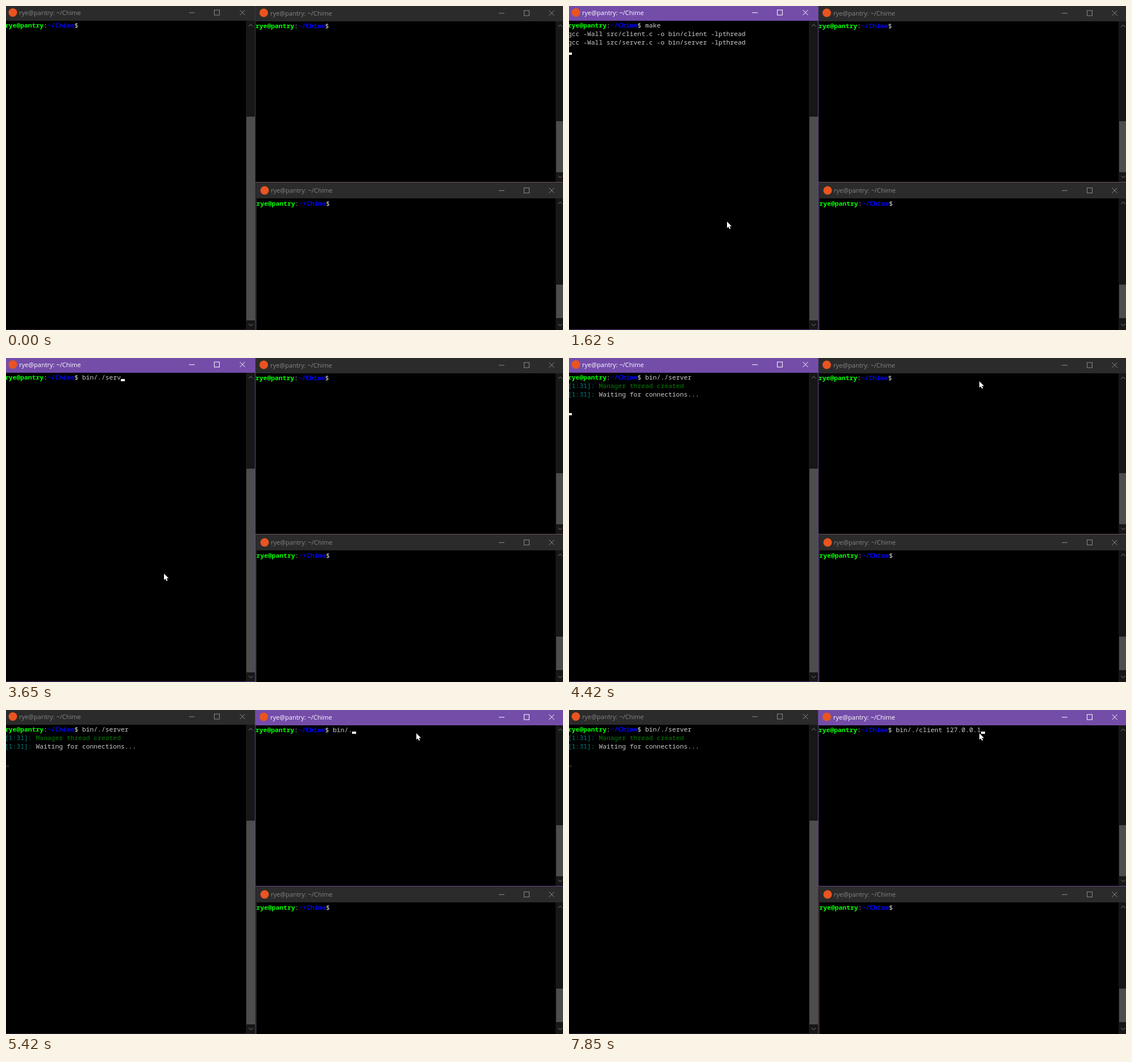
Write an HTML page with a canvas that moves like this. It is 980 by 571 pixels and loops after 8 s.

```html
<!DOCTYPE html>
<html lang="en">
<head>
<meta charset="utf-8">
<title>Terminals</title>
<style>
html, body { margin: 0; width: 100%; height: 100%; overflow: hidden; background: #000; }
canvas { display: block; width: 980px; height: 571px; }
</style>
</head>
<body>
<canvas id="stage" width="980" height="571"></canvas>
<script>
const ctx = document.getElementById('stage').getContext('2d');
const LOOP = 8000, CELL = 6.8, LINE = 15;
const USER = 'rye@pantry', PATH = '~/Chime', PROMPT_COLS = 20;
const MONO = '11.33px "Noto Sans Mono", monospace';
const SANS = '11px "Open Sans", sans-serif';
const GREY = '#ccc', TEAL = '#008080', GREEN = '#008000';

const left = { x: 0, y: 0, w: 438, h: 570, bar: 26, icon: [12, 11.5], title: [23, 16],
  buttons: [327, 371, 416], mid: 11, text: [-2, 38], track: [422, 16], thumb: [195, 554], arrows: [430.5, 34, 562] };
const upper = { x: 439, y: 0, w: 541, h: 310, bar: 27, icon: [453.5, 12], title: [465, 17],
  buttons: [872, 916, 960], mid: 12, text: [439, 39], track: [967, 13], thumb: [203, 293], arrows: [975, 35, 301] };
const lower = { x: 441, y: 311, w: 539, h: 260, bar: 28, icon: [455, 325], title: [466, 329],
  buttons: [872, 916, 960], mid: 324.5, text: [440.5, 352], track: [967, 13], thumb: [491, 550], arrows: [975, 347, 562] };

// Each entry is a time and the command visible from then on.
const makeTyping = [[0, ''], [840, 'm'], [915, 'ma'], [990, 'make']];
const serverTyping = [[0, ''], ...typed('', 'bin', 2690, 85), [3010, 'bin/'],
  ...typed('bin/', './ser', 3170, 80), ...typed('bin/./ser', 'ver', 3650, 75)];
const clientTyping = [[0, ''], ...typed('', 'bin', 4960, 80), [5270, 'bin/'], [5420, 'bin/.'],
  [5670, 'bin/.c'], [5970, 'bin/.'], [6200, 'bin/./'], [6370, 'bin/./c'],
  ...typed('bin/./c', 'lie', 6520, 77), ...typed('bin/./clien', 't 127', 6751, 77),
  ...typed('bin/./client 127', '.0.0.', 7370, 75), [7850, 'bin/./client 127.0.0.1']];
const mousePath = [[70, [638, 509]], [140, [430, 434]], [210, [278, 380]],
  [4270, [380, 302]], [4345, [604, 131]], [4420, [722, 41]]];

function typed(prefix, word, start, step) {
  return [...word].map((c, i) => [start + i * step, prefix + word.slice(0, i + 1)]);
}

function latest(steps, t) {
  let value;
  for (const [time, v] of steps) if (time <= t) value = v;
  return value;
}

function box(x, y, w, h, color) {
  ctx.fillStyle = color;
  ctx.fillRect(x, y, w, h);
}

function disc(x, y, r, color) {
  ctx.fillStyle = color;
  ctx.beginPath();
  ctx.arc(x, y, r, 0, Math.PI * 2);
  ctx.fill();
}

function stroke(color, ...lines) {
  ctx.strokeStyle = color;
  ctx.lineWidth = 1;
  ctx.beginPath();
  for (const line of lines) line.forEach(([x, y], i) => i ? ctx.lineTo(x, y) : ctx.moveTo(x, y));
  ctx.stroke();
}

function write(win, col, row, text, color, weight = 400) {
  ctx.font = `${weight} ${MONO}`;
  ctx.fillStyle = color;
  ctx.fillText(text, win.text[0] + col * CELL, win.text[1] + row * LINE);
}

function block(win, col, row, color = '#fff') {
  const x = Math.round(win.text[0] + col * CELL);
  box(x, win.text[1] - 1 + row * LINE, 7, 4, color);
}

function prompt(win, command = '') {
  write(win, 0, 0, USER, '#00ff00', 600);
  write(win, 10, 0, ':', GREY);
  write(win, 11, 0, PATH, '#0000ff', 600);
  write(win, 18, 0, '$', '#ddd');
  write(win, PROMPT_COLS, 0, command, GREY);
}

function commandLine(win, command, focused) {
  prompt(win, command);
  if (focused) block(win, PROMPT_COLS + command.length, 0);
}

function frame(win, active) {
  const { x, y, w, h, bar, mid } = win;
  box(x, y, w, h, '#000');
  box(x, y, w, bar, active ? '#744da9' : '#2b2b2b');
  disc(...win.icon, 7.5, '#e95420');
  ctx.font = SANS;
  ctx.fillStyle = active ? '#fff' : '#858585';
  ctx.fillText(`${USER}: ${PATH}`, ...win.title);

  const [min, max, close] = win.buttons, ink = active ? '#fff' : '#8b8b8b';
  stroke(ink, [[min - 5, mid + .8], [min + 5, mid + .8]],
    [[close - 4.5, mid - 4], [close + 4.5, mid + 5]], [[close + 4.5, mid - 4], [close - 4.5, mid + 5]]);
  ctx.strokeRect(max - 4.5, mid - 4, 9, 9);

  const [tx, tw] = win.track, [from, to] = win.thumb, [ax, ...ays] = win.arrows;
  box(tx, y + bar, tw, h - bar, '#171717');
  box(tx + 1, from, tw - 1, to - from, '#4d4d4d');
  ays.forEach((ay, i) => {
    const d = i ? 1.75 : -1.75;
    stroke('#858585', [[ax - 3.5, ay - d], [ax, ay + d], [ax + 3.5, ay - d]]);
  });
}

function leftScreen(t, focused) {
  if (t < 1140) return commandLine(left, latest(makeTyping, t), focused);
  if (t < 1990) {
    prompt(left, 'make');
    const targets = t < 1620 ? ['client'] : ['client', 'server'];
    targets.forEach((name, i) =>
      write(left, 0, i + 1, `gcc -Wall src/${name}.c -o bin/${name} -lpthread`, GREY));
    return block(left, 0, targets.length + 1);
  }
  if (t < 2070) return block(left, 0, 0);
  const command = latest(serverTyping, t);
  if (t < 3875) return commandLine(left, command, focused);
  prompt(left, command);
  if (t < 3950) return block(left, 0, 1);
  [['Manager thread created', GREEN], ['Waiting for connections...', GREY]].forEach(([text, color], i) => {
    write(left, 0, i + 1, '[1:31]:', TEAL);
    write(left, 8, i + 1, text, color);
  });
  block(left, 0, 4, focused ? '#fff' : '#1a1a1a');
}

function mouse(t) {
  const at = latest(mousePath, t);
  if (!at) return;
  const [x, y] = at;
  if ((t >= 380 && t < 440) || (t >= 4500 && t < 4580)) disc(x - .7, y - .7, 11.5, 'rgba(255,255,0,.5)');
  ctx.beginPath();
  [[0, 0], [0, 11.3], [2.6, 8.9], [4.4, 13], [6.3, 12.2], [4.6, 8.2], [8.2, 8.2]]
    .forEach(([dx, dy]) => ctx.lineTo(x + dx, y + dy));
  ctx.closePath();
  ctx.strokeStyle = '#000';
  ctx.lineWidth = 1;
  ctx.stroke();
  ctx.fillStyle = '#fff';
  ctx.fill();
}

function draw(t) {
  const leftActive = t >= 380 && t < 4500, upperActive = t >= 4500;
  box(0, 0, 980, 571, '#000');
  box(439, 310, 2, 261, '#2a2530');
  frame(left, leftActive);
  frame(upper, upperActive);
  frame(lower, false);
  box(438, 0, 1, 571, leftActive ? '#65458f' : '#49343c');
  if (upperActive) box(438, 0, 1, 311, '#65458f');
  box(439, 310, 541, 1, upperActive ? '#65458f' : '#704c56');
  box(0, 570, 439, 1, leftActive ? '#54397a' : '#2c2036');
  leftScreen(t, leftActive && t >= 440);
  commandLine(upper, latest(clientTyping, t), t >= 4580);
  prompt(lower);
  mouse(t);
}

const start = performance.now();
function tick() {
  draw((performance.now() - start) % LOOP);
  requestAnimationFrame(tick);
}
tick();
</script>
</body>
</html>
```
